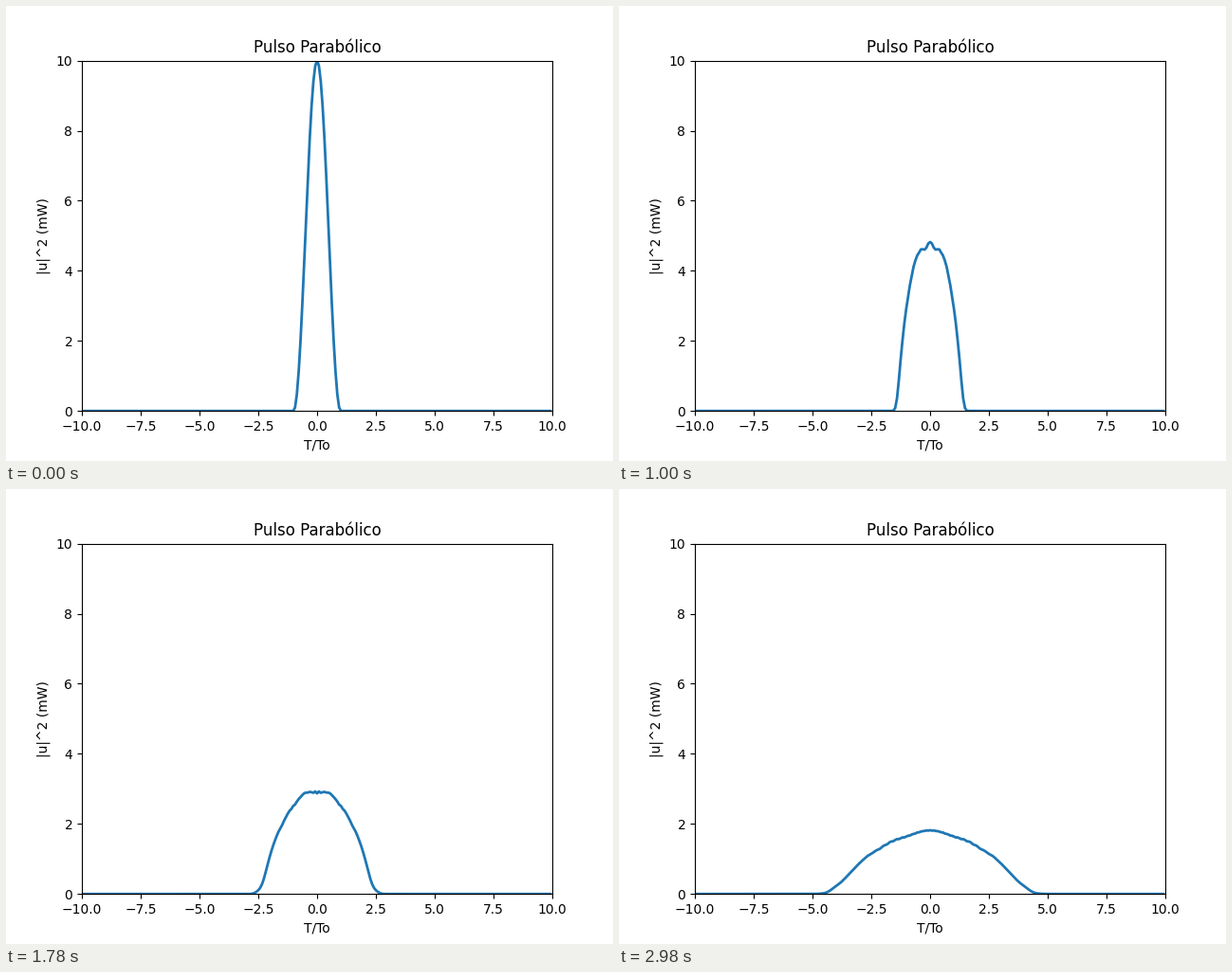
A matplotlib script for the animation above (3 s loop, 640 by 480 pixels).

```python
import numpy as np
import matplotlib.pyplot as plt
from matplotlib.animation import FuncAnimation

FRAMES = 150
INTERVAL = 20        # ms
PEAK = 10.0          # mW
GAMMA = 30.0         # nonlinear coefficient
DZ = 0.001           # distance covered per frame
SUBSTEPS = 10
POINTS = 256

T = np.linspace(-10, 10, POINTS, endpoint=False)
K = 2 * np.pi * np.fft.fftfreq(POINTS, T[1] - T[0])


def initial_pulse():
    return np.where(np.abs(T) < 1, np.sqrt(PEAK) * np.cos(np.pi * T / 2), 0).astype(complex)


def propagate(u):
    """Advance the field by DZ with symmetric split steps (normal dispersion)."""
    h = DZ / SUBSTEPS
    half = np.exp(-0.25j * K**2 * h)
    for _ in range(SUBSTEPS):
        u = np.fft.ifft(half * np.fft.fft(u))
        u = u * np.exp(-1j * GAMMA * np.abs(u)**2 * h)
        u = np.fft.ifft(half * np.fft.fft(u))
    return u


def simulate():
    u = initial_pulse()
    power = []
    for _ in range(FRAMES):
        power.append(np.abs(u)**2)
        u = propagate(u)
    return power


power = simulate()

fig, ax = plt.subplots(figsize=(6.4, 4.8), dpi=100)
ax.set(xlim=(-10, 10), ylim=(0, 10), title="Pulso Parabólico",
       xlabel="T/To", ylabel="|u|^2 (mW)")
line, = ax.plot(T, power[0], lw=2)


def update(i):
    line.set_ydata(power[i])
    return line,


anim = FuncAnimation(fig, update, frames=FRAMES, interval=INTERVAL,
                     repeat=True, repeat_delay=0)
plt.show()
```
